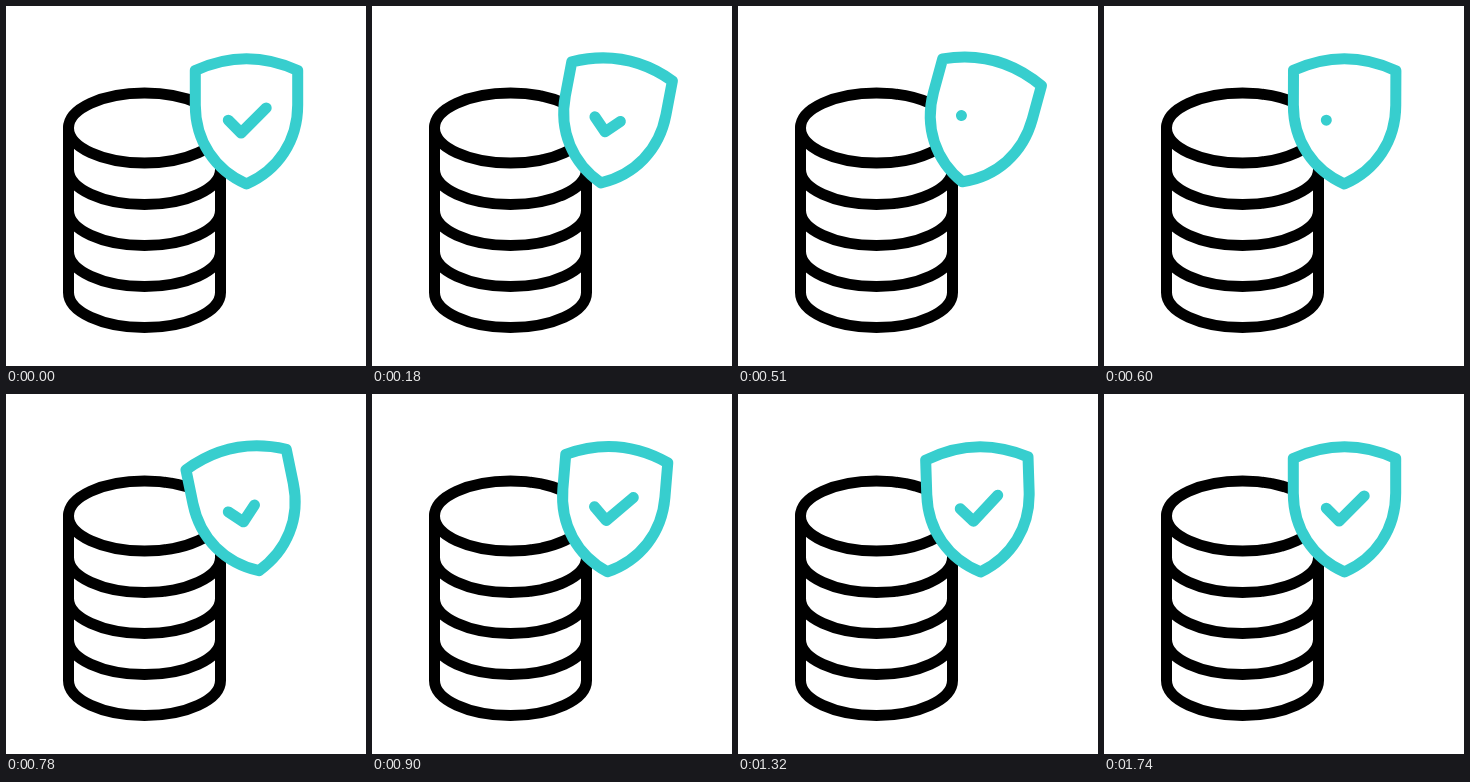
An HTML page for the animation above (1.8 s loop, 360x360 px).

```html
<!DOCTYPE html>
<html lang="en">
<head>
<meta charset="utf-8">
<title>Protected database</title>
<style>
  html, body { margin: 0; height: 100%; overflow: hidden; background: #fff; }
  svg { display: block; width: 100vw; height: 100vh; }
  path, ellipse { fill: none; stroke-width: 11; stroke-linecap: round; stroke-linejoin: round; }
  .database { stroke: #000; }
  .shield { stroke: #37cece; }
  .shield .body { fill: #fff; }
</style>
</head>
<body>
<svg viewBox="0 0 360 360">
  <g class="database">
    <ellipse cx="138.5" cy="122" rx="76" ry="35"/>
    <path d="M62.5 122V286.5a76 35 0 0 0 152 0V122"/>
    <path d="M62.5 163.5a76 35 0 0 0 152 0M62.5 204.5a76 35 0 0 0 152 0M62.5 245.5a76 35 0 0 0 152 0"/>
  </g>
  <g class="shield" id="shield">
    <path class="body" d="M189.3 64.5Q240.5 41 291.7 64.5V99C291.7 135 272 164 240.5 178C209 164 189.3 135 189.3 99Z"/>
    <path id="check"/>
  </g>
</svg>
<script>
const LOOP = 1800;
const shield = document.getElementById('shield');
const check = document.getElementById('check');

// [time in ms, value]
const swing = [[0, 0], [400, 25], [740, -14], [930, 6], [1220, -2.2], [1620, 0]];
const reveal = [[0, 1], [480, 0], [600, 0], [880, 1]];

const ease = x => x * x * (3 - 2 * x);

function valueAt(keys, t) {
  const next = keys.findIndex(([time]) => time > t);
  if (next < 0) return keys[keys.length - 1][1];
  const [t0, a] = keys[next - 1], [t1, b] = keys[next];
  return a + (b - a) * ease((t - t0) / (t1 - t0));
}

// The part of the tick drawn so far, never less than a dot
function checkPath(part) {
  const short = 18.1, long = 35.5;
  const drawn = Math.max(0.01, part * (short + long));
  const down = Math.min(drawn, short) / short * 12.8;
  const up = Math.max(0, drawn - short) / long * 25.1;
  return `M222.3 114.2l${down} ${down}` + (up ? `l${up} ${-up}` : '');
}

function draw() {
  const t = performance.now() % LOOP;
  shield.setAttribute('transform', `rotate(${valueAt(swing, t)} 240.5 116)`);
  check.setAttribute('d', checkPath(valueAt(reveal, t)));
  requestAnimationFrame(draw);
}
draw();
</script>
</body>
</html>
```
